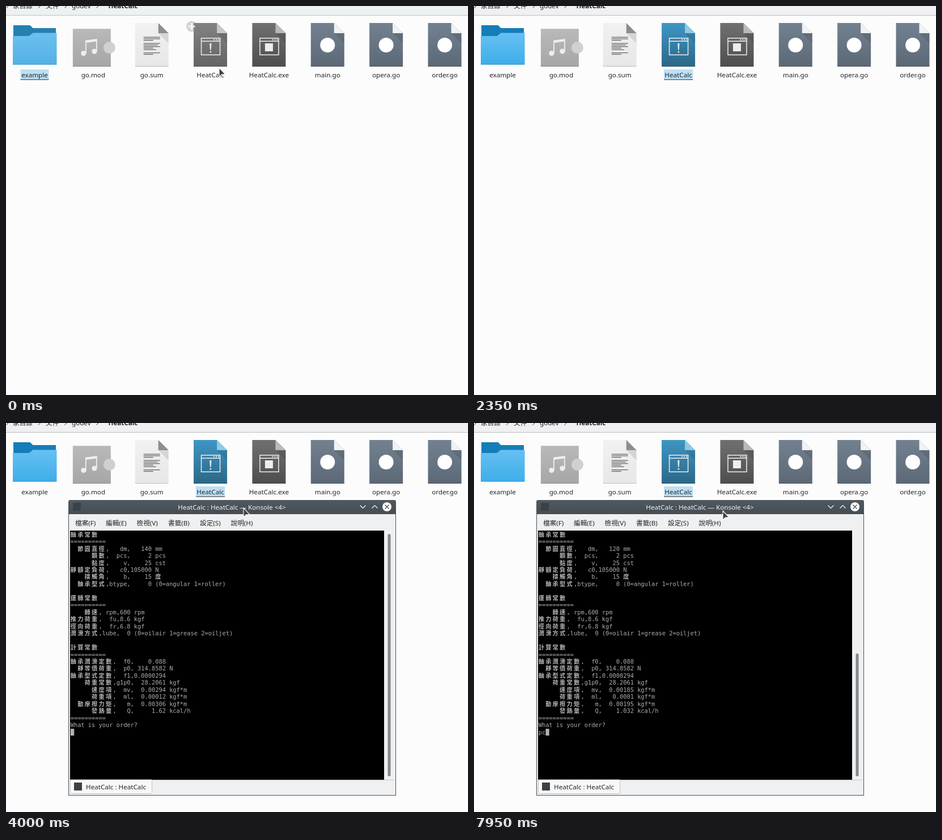
Recreate the animation shown at these times as an HTML page. Size 815 px wide and 687 px high, loop 8000 ms.

```html
<!DOCTYPE html>
<html lang="zh-Hant">
<head>
<meta charset="utf-8">
<style>
html, body { margin: 0; width: 100%; height: 100%; overflow: hidden; background: #fcfcfc; }
svg { display: block; font: 11.65px "Noto Sans", "Noto Sans CJK TC", "Noto Sans CJK", sans-serif; }
.mono { font: 10.35px "DejaVu Sans Mono", monospace; fill: #adadad; }
.wide { font: bold 10.2px "Noto Sans CJK TC", "Noto Sans CJK", sans-serif; letter-spacing: 2.26px; fill: #b4b4b4; }
</style>
</head>
<body>
<svg id="stage" width="815" height="687" viewBox="0 0 815 687"></svg>
<script>
const LOOP = 8000, STEP = 50, CELL = 6.23, LINE = 12.46;
const INK = '#232629', BLUE = '#3daee9', CHROME = '#eff0f1';
const stage = document.getElementById('stage');

// ---- helpers ----
const clamp = v => Math.max(0, Math.min(1, v));
const esc = s => s.replace(/&/g, '&amp;').replace(/</g, '&lt;');
const rect = (x, y, w, h, fill, more = '') =>
  `<rect x="${x}" y="${y}" width="${w}" height="${h}" fill="${fill}" ${more}/>`;
const path = (d, fill, more = '') => `<path d="${d}" fill="${fill}" ${more}/>`;
const line = (d, color, width = 1) => path(d, 'none', `stroke="${color}" stroke-width="${width}"`);
const circle = (x, y, r, fill, more = '') => `<circle cx="${x}" cy="${y}" r="${r}" fill="${fill}" ${more}/>`;
const text = (x, y, s, fill = INK, more = '') => `<text x="${x}" y="${y}" fill="${fill}" ${more}>${esc(s)}</text>`;
const group = (x, y, body, more = '') => `<g transform="translate(${x} ${y})" ${more}>${body}</g>`;
const chevron = (x, y, size = 5) => `M${x - size / 2} ${y - size}l${size} ${size}l${-size} ${size}`;
const MIDDLE = 'text-anchor="middle"', END = 'text-anchor="end"';

function mix(a, b, p) {
  const part = (hex, i) => parseInt(hex.slice(i, i + 2), 16);
  return '#' + [1, 3, 5].map(i =>
    Math.round(part(a, i) + (part(b, i) - part(a, i)) * p).toString(16).padStart(2, '0')).join('');
}
const mixAll = (a, b, p) => a.map((c, i) => mix(c, b[i], p));
const latest = (steps, t) => steps.filter(s => s[0] <= t).pop();

const gradient = (id, top, bottom) =>
  `<linearGradient id="${id}" x2="0" y2="1"><stop stop-color="${top}"/><stop offset="1" stop-color="${bottom}"/></linearGradient>`;

// ---- timeline ----
const POINTER = [
  [0, 376, 109], [200, 375, 107], [450, 374, 105], [850, 376, 113], [900, 379, 126], [950, 384, 140],
  [1000, 388, 160], [1050, 393, 185], [1100, 401, 212], [1150, 410, 240], [1200, 418, 266], [1250, 426, 282],
  [1650, 621, 280], [1800, 682, 280], [2050, 750, 258], [2350],
  [3250, 498, 126, 'move'], [3400, 465, 133, 'move'], [3600, 397, 163, 'move'], [3700, 419, 151, 'move'],
  [4000, 419, 150], [4150, 428, 152], [4250, 439, 155]
];
const WINDOW = [[0], [3250, 193, 112], [3400, 158, 119], [3600, 88, 148], [3700, 110, 136]];
const TYPED = [[0, ''], [4750, 'd'], [5050, 'dm'], [5550, 'dm '], [6200, 'dm 1'], [6450, 'dm 120'],
  [6750, ''], [7800, 'p'], [7950, 'pc']];

// ---- file icons, drawn around x = 0 ----
const page = (fill, fold, body, edge = '#0004') =>
  path('M-29.5 30H11.5L29.5 48V107H-29.5Z', fill) +
  path('M11.5 48H29.5V66Z', '#000', 'opacity=".1"') +
  path('M11.5 30L29.5 48H11.5Z', fold) + rect(-29.5, 106, 59, 1, edge) + body;

const frame = inner => rect(-16, 56.8, 33, 29.5, 'none', 'stroke="#eee" stroke-width="1.5"') +
  line('M-16 62.3H17', '#eee', 1.4) + [5.5, 9.5, 13.5].map(x => rect(x, 58.5, 2, 2, '#eee')).join('') + inner;

const bang = frame(path('M-1.3 66H1.9L1.1 78H-.5Z', '#eee') + rect(-1, 80, 2.6, 2.4, '#eee'));
const plainSquare = frame(rect(-7, 66, 14, 14, '#eee'));

function sheet() {
  const widths = [29, 29, 17, 0, 29, 25, 29, 17, 22, 0, 29, 17];
  return widths.map((w, i) => rect(-14.5, 54.5 + i * 2.75, w, 1.3, '#666')).join('');
}

const puzzle = () => rect(-36, 40, 67, 67, 'url(#gMod)') + circle(28.5, 73.5, 10.5, '#d0d0d0') +
  rect(-36, 40, 67, 1, '#ccc') + rect(-36, 106, 67, 1, '#888') +
  line('M-13 84V61.5L6 59V80', '#eee', 1.8) + line('M-13 63L6 60.5', '#eee', 4) +
  circle(-17, 83.5, 4.6, '#eee') + circle(2, 80, 4.6, '#eee');

const folder = back => path('M-37.5 34H-8L-3 39H37.5V60H-37.5Z', back) +
  path('M-38.5 53H-10L-3 47.5H39V103.5H-38.5Z', 'url(#gFolder)') +
  rect(-38.5, 102.5, 77.5, 1, '#2980b9', 'opacity=".6"');

const goFile = () => page('url(#gGo)', '#f2f2f2', circle(0, 69, 13, '#fff'));

function label(name, style) {
  const w = name === 'example' ? 50 : 51;
  let out = '';
  if (style === 'soft') out = rect(-w / 2, 112, w, 18, '#bddff5') + rect(-w / 2, 129.5, w, 1, INK);
  if (style === 'strong') out = rect(-w / 2, 112, w, 18, '#5cbaee');
  return out + text(0, 125.5, name, style === 'strong' ? '#fff' : INK, MIDDLE);
}

function emblem(t) {
  if (t < 150) return circle(327.5, 36, 9.5, '#888', 'opacity=".35"') +
    group(327.5, 36, line('M-6 0H6M0 -6V6', '#fff', 3), 'opacity=".75"');
  if (t < 2150) return rect(318, 26, 19, 19, '#aeb2b5', 'rx="2"') + line('M321 35.5h13', '#fff', 3);
  return '';
}

function desktop(t) {
  const focus = clamp(t / 300), leave = clamp((t - 2000) / 150);
  const hover = mixAll(['#828282', '#646464', '#c6c6c6'], ['#7cb8d6', '#609fbd', '#b6dbeb'], focus);
  const app = mixAll(hover, ['#3f96c4', '#2b6788', '#8fc9e4'], leave);
  const folderTop = mix('#6dc0ee', '#67c0f2', focus), folderEnd = mix('#52b1e6', '#3daee9', focus);
  const border = t < 2350 ? mix('#9fd0e8', '#4fb4e6', focus) : '#bcbebf';
  const chosen = t < 100 ? '' : t < 2350 ? 'strong' : 'soft';
  const files = [
    ['example', folder(mix('#267fb1', '#147eb8', focus)), t < 100 ? 'soft' : ''],
    ['go.mod', puzzle()],
    ['go.sum', page('url(#gText)', '#8d8d8d', sheet(), '#bbb')],
    ['HeatCalc', page('url(#gApp)', app[2], bang), chosen],
    ['HeatCalc.exe', page('url(#gExe)', '#b9b9b9', plainSquare)],
    ['main.go', goFile()], ['opera.go', goFile()], ['order.go', goFile()]
  ];
  return '<defs>' + gradient('gFolder', folderTop, folderEnd) + gradient('gMod', '#b9b9b9', '#a6a6a6') +
    gradient('gText', '#f1f1f1', '#e7e7e7') + gradient('gApp', app[0], app[1]) +
    gradient('gExe', '#707070', '#4e4e4e') + gradient('gGo', '#728190', '#5c6876') +
    gradient('gTitle', '#50595f', '#454d54') + '</defs>' +
    rect(0, 0, 815, 687, '#fcfcfc') + rect(0, 0, 815, 16, CHROME) + rect(0, 16, 815, 1, border) +
    [2.5, 59, 105.5, 161.5].map(x => line(chevron(x, -.5, 4), INK)).join('') +
    text(12, 4, '家目錄') + text(70, 4, '文件') + text(116, 4, 'godev') +
    text(180.5, 4, 'HeatCalc', INK, 'font-weight="600"') +
    files.map(([name, icon, style], i) => group(50.5 + 103.35 * i, 0, icon + label(name, style))).join('') +
    emblem(t);
}

// ---- context menu ----
const termIcon = (x, y) => rect(x - 7, y - 7, 14, 14, '#3b4146');
const ring = (x, y, color) => circle(x, y, 1.6, 'none', `stroke="${color}"`);
const glyphs = {
  cut: c => line('M-2.5 -5L2 3M2.5 -5L-2 3', c) + ring(-2.7, 4, c) + ring(2.7, 4, c),
  copy: c => line('M-1.5 3.5H-4.5V-4.5H3.5V-3M-1.5 -2.5H4.5V2.5L2 5H-1.5Z', c),
  paste: c => line('M-4.5 -4H4.5V5.5H-4.5ZM-2 -1H2M-2 2H1', c) + rect(-2, -6, 4, 3, c),
  rename: c => line('M-4.5 4.5L-3.5 1.5L2 -4L4.5 -1.5L-1.5 4.5Z', c, 1.2) + path('M0 -2L2 -4L4.5 -1.5L2.5 .5Z', c),
  trash: c => line('M-5 -3.5H5M-2 -4V-5.5H2V-4M-3.5 -3.5V5H3.5V-3.5', c, 1.1),
  term: () => termIcon(0, 0),
  dots: c => [-4, 0, 4].map(x => circle(x, 0, 1.1, c)).join(''),
  props: c => line('M-5 -4.5H5V4.5H-5Z', c) + rect(-5, -5, 10, 3, c) + rect(-3.5, -.5, 2, 3.5, c) + line('M0 .5H3.5M0 2.5H3.5', c)
};
const MENU = [
  [117.5, '剪下(T)', 'cut', 'Ctrl+X'], [140.5, '複製(C)', 'copy', 'Ctrl+C'], [163.5, '貼上剪貼簿內容...', 'paste', 'Ctrl+V'],
  [193, '重新命名(R)...', 'rename', 'F2'], [216, '移到資源回收筒(M)', 'trash', 'Del'],
  [245.5, '用 Konsole 開啟(W)', 'term'], [268.5, '開啟方式(O)...'], [291.5, '動作(A)', '', '>'],
  [314.5, '活動', 'dots', '>'], [338, '壓縮', '', '>'], [361, '屬性', 'props', 'Alt+Return']
];
const ACTIONS = ['在 Konsole 中執行', '加入書籤', '建立連結', '校驗檔案', '簽署檔案', '加密檔案'];
const panel = (x, y, w, h) => rect(x, y, w, h, '#f3f5f5', 'stroke="#b8babb"');

function menu(t, x, y) {
  if (t < 800 || t >= 2050) return '';
  let out = panel(374.5, 105.5, 218, 266) + line('M376 178H591M376 230.5H591', '#c3c6c7');
  for (const [cy, name, icon, key] of MENU) {
    const on = x > 592 ? name === '動作(A)' : Math.abs(y - cy) <= 11.5 && y > 106;
    const ink = on ? '#fff' : INK;
    if (on) out += rect(375, cy - 11.5, 217, 23, BLUE);
    if (icon) out += group(385.5, cy - .5, glyphs[icon](ink));
    out += text(398, cy + 4, name, ink);
    if (key === '>') out += line(chevron(581, cy - .5), ink, 1.1);
    else if (key) out += text(569, cy + 3.5, key, ink, END);
  }
  if (t < 1550) return out;
  return out + panel(592.5, 279.5, 159, 138) + ACTIONS.map((name, i) => {
    const on = i === 0 && x > 592;
    return (on ? rect(593, 280, 158, 23, BLUE) : '') + text(616, 295.5 + 23 * i, name, on ? '#fff' : INK);
  }).join('');
}

// ---- terminal window ----
function report(dm, mv, ml, m, q) {
  const rule = '==========';
  return [
    '軸承常數', rule,
    `  節圓直徑,   dm,   ${dm} mm`, '      顆數,  pcs,     2 pcs', '      黏度,    v,    25 cst',
    '靜額定負荷,   c0,105000 N', '    接觸角,    b,    15 度', '  軸承型式,btype,     0 (0=angular 1=roller)',
    '', '運轉常數', rule,
    '    轉速, rpm,600 rpm', '推力荷重,  fu,8.6 kgf', '徑向荷重,  fr,6.8 kgf',
    '潤滑方式,lube,  0 (0=oilair 1=grease 2=oiljet)',
    '', '計算常數', rule,
    '軸承潤滑定數,  f0,    0.088', '  靜等價荷重,  p0, 314.8582 N', '軸承型式定數,  f1,0.0000294',
    '    荷重常數,g1p0,  28.2061 kgf', `      速度項,  mv,${mv.padStart(9)} kgf*m`,
    `      荷重項,  ml,${ml.padStart(9)} kgf*m`, `  動摩擦力矩,   m,${m.padStart(9)} kgf*m`,
    `      發熱量,   Q,${q.padStart(9)} kcal/h`, rule, 'What is your order?'
  ];
}

// Chinese glyphs take two cells, everything else one.
function terminalRow(row, i) {
  let out = '', wide = 0;
  for (const { 0: run, index } of row.matchAll(/[^\x00-\x7f]+|[!-~]+/g)) {
    const isWide = run.charCodeAt(0) > 127;
    out += text(3.7 + (index + wide) * CELL, 64.7 + i * LINE, run, '', `class="${isWide ? 'wide' : 'mono'}"`);
    if (isWide) wide += run.length;
  }
  return out;
}

function terminal(t) {
  const [, x, y] = latest(WINDOW, t);
  if (x === undefined) return '';
  const done = t >= 6750, typed = latest(TYPED, t)[1];
  const rows = done ? report(120, '0.00185', '0.0001', '0.00195', '1.032') : report(140, '0.00294', '0.00012', '0.00306', '1.62');
  rows.push(typed);
  const thumbTop = done ? 271 : 60;
  const menus = ['檔案(F)', '編輯(E)', '檢視(V)', '書籤(B)', '設定(S)', '說明(H)'];
  const menuX = [12, 66, 120.5, 176, 232, 286.5];
  return group(x, y,
    path('M0 522V4Q0 0 4 0H574Q578 0 578 4V522Z', '#475057') +
    path('M0 25V4Q0 0 4 0H574Q578 0 578 4V25Z', 'url(#gTitle)') +
    rect(1, 25, 576, 496, CHROME) + termIcon(15, 12) +
    text(288.5, 16.5, 'HeatCalc : HeatCalc — Konsole <4>', '#f2f3f3', MIDDLE) +
    line('M514.5 9.5l5 5l5 -5M535.5 14.5l5 -5l5 5', '#fcfcfc', 1.2) +
    circle(562, 12, 8, '#fcfcfc') + line('M558.5 8.5l7 7m0 -7l-7 7', '#475057', 1.3) +
    menus.map((s, i) => text(menuX[i], 45, s)).join('') +
    rect(3, 54, 554, 440, '#000') + rows.map(terminalRow).join('') +
    rect(4 + typed.length * CELL, 404, 6.2, 12, '#b2b2b2') +
    rect(563.5, thumbTop, 5, 488 - thumbTop, '#85898c', 'rx="2.5"') +
    rect(3, 494, 572, 1, '#c4c7c9') +
    path('M3.5 494V516.5Q3.5 518.5 5.5 518.5H145.5Q147.5 518.5 147.5 516.5V494Z', '#f8f8f8', 'stroke="#c0c3c5"') +
    termIcon(17, 506) + text(31, 510.5, 'HeatCalc : HeatCalc'));
}

// ---- pointer ----
function pointer(x, y, kind) {
  if (x === undefined) return '';
  const outline = 'stroke="#fff" stroke-width="1.1" stroke-linejoin="round"';
  if (kind !== 'move') return group(x, y, path('M0 0V16.5L4.5 11.8H11Z', '#3b3f43', outline));
  const arrow = a => `<g transform="rotate(${a})">${path('M0 -11.5L4 -6H-4Z', '#3b3f43', outline)}</g>`;
  return group(x, y, [0, 90, 180, 270].map(arrow).join('') + circle(0, 0, 2.4, '#f08a3c', outline));
}

const start = performance.now();
let shown = -1;

function tick() {
  const t = Math.floor((performance.now() - start) % LOOP / STEP) * STEP;
  if (t !== shown) {
    const [, x, y, kind] = latest(POINTER, t);
    stage.innerHTML = desktop(t) + menu(t, x, y) + terminal(t) + pointer(x, y, kind);
    shown = t;
  }
  requestAnimationFrame(tick);
}
tick();
</script>
</body>
</html>
```
